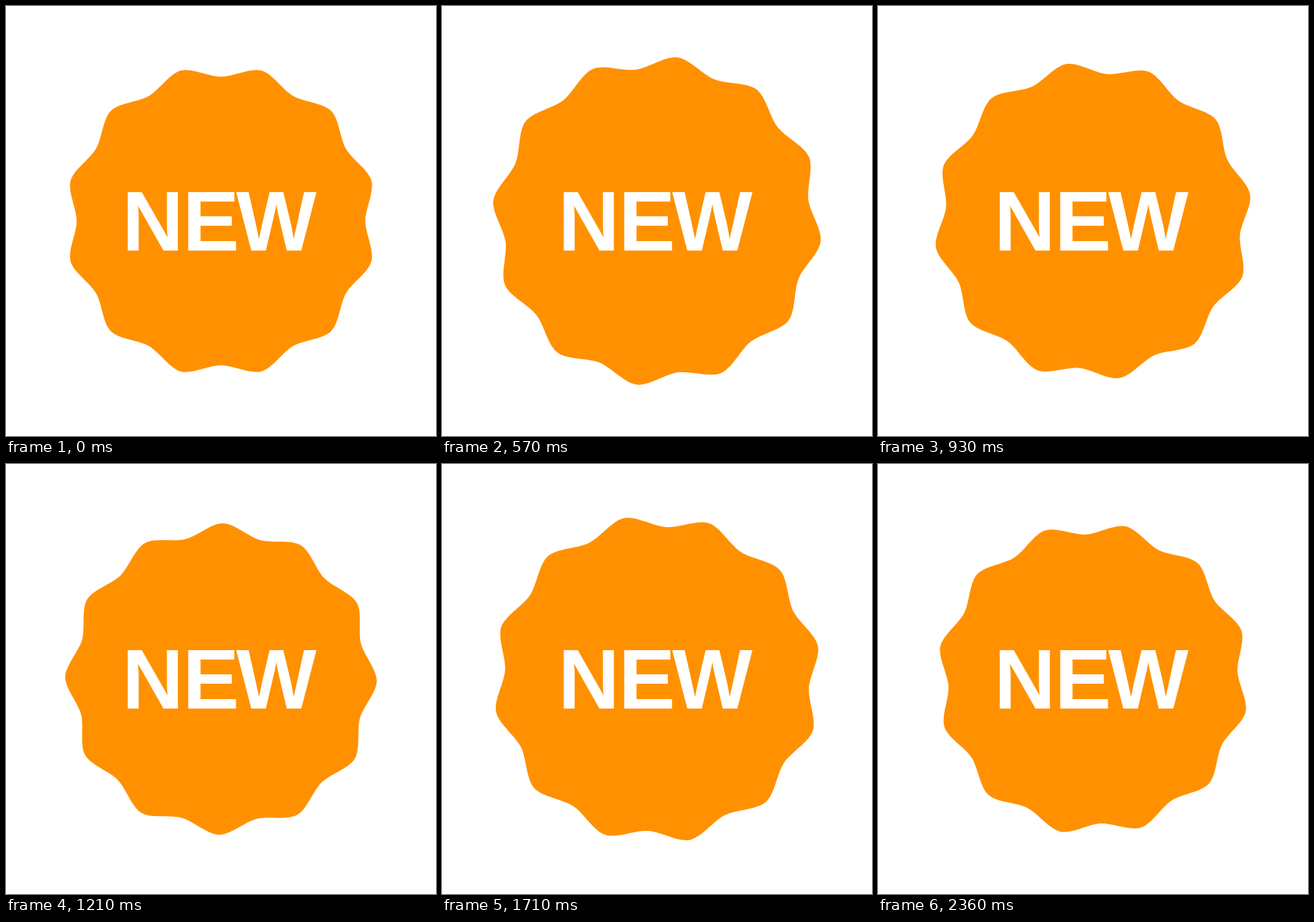
Recreate the animation shown at these times as an HTML page. Size 640 px wide and 640 px high, loop 2430 ms.

```html
<!DOCTYPE html>
<html lang="en">
<head>
<meta charset="utf-8">
<title>New badge</title>
<style>
  html, body { margin: 0; width: 100%; height: 100%; overflow: hidden; background: #fff; }
  svg { display: block; width: 100%; height: 100%; }
  text { font: bold 126.8px "Liberation Sans", Arial, sans-serif; fill: #fff; }
</style>
</head>
<body>
<svg viewBox="0 0 640 640">
  <path id="badge" fill="#ff9100"/>
  <text x="172.8 262.8 342.4" y="363.6">NEW</text>
</svg>
<script>
const LOOP = 2430;
const SHOWN_FPS = 14;   // rate at which the picture changes
const DRAWN_FPS = 25;   // rate at which the motion is stepped
const STEPS = 61;
const LOBES = 12;
const TIP = { r: 231.8, handle: 17 };
const DIP = { r: 214.8, handle: 18 };

const badge = document.getElementById('badge');

// Point at a radius and clockwise angle from the top, shifted along the tangent.
function polar(r, a, shift = 0) {
  const x = r * Math.sin(a) + shift * Math.cos(a);
  const y = -r * Math.cos(a) + shift * Math.sin(a);
  return x.toFixed(2) + ' ' + y.toFixed(2);
}

function badgePath() {
  const half = Math.PI / LOBES;
  let d = 'M' + polar(DIP.r, 0);
  for (let i = 0; i < LOBES * 2; i++) {
    const [from, to] = i % 2 ? [TIP, DIP] : [DIP, TIP];
    const a = i * half, b = a + half;
    d += 'C' + [
      polar(from.r, a, from.handle),
      polar(to.r, b, -to.handle),
      polar(to.r, b)
    ].join(' ');
  }
  return d + 'Z';
}

function render(ms) {
  const t = Math.floor((ms % LOOP) / 10) * 10;
  const shown = Math.floor((t + 5) * SHOWN_FPS / 1000);
  const phase = Math.ceil(shown * DRAWN_FPS / SHOWN_FPS) / STEPS;
  const angle = 90 * phase;
  const scale = 1 + 0.0295 * (1 - Math.cos(4 * Math.PI * phase));
  badge.setAttribute('transform', `translate(320 320) rotate(${angle}) scale(${scale})`);
}

badge.setAttribute('d', badgePath());
render(0);

const start = performance.now();
function tick() {
  render(performance.now() - start);
  requestAnimationFrame(tick);
}
requestAnimationFrame(tick);
</script>
</body>
</html>
```
